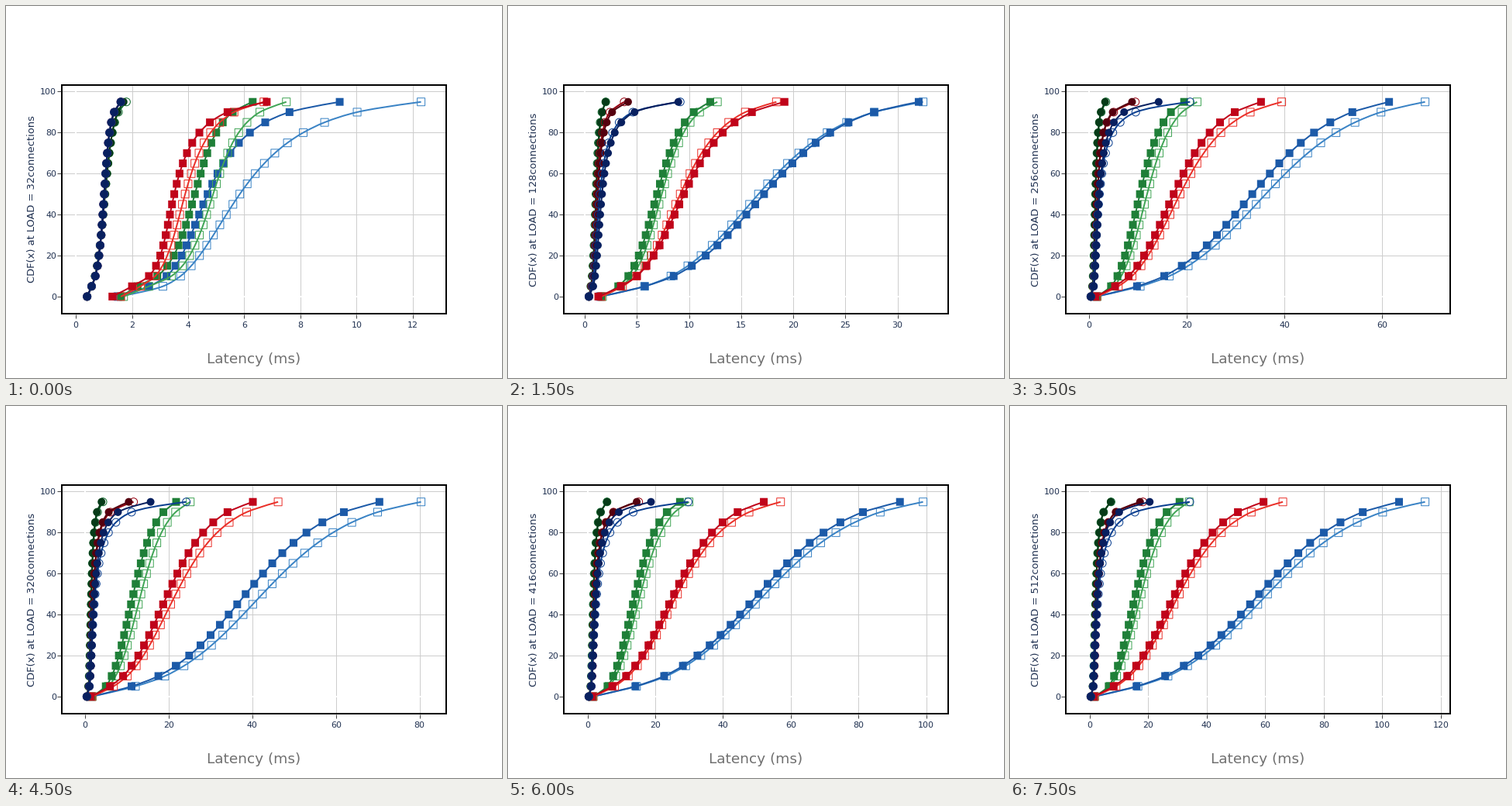
Write a matplotlib script that moves like this. It is 640x480 px and loops after 8 s.

```python
import numpy as np
import matplotlib.pyplot as plt
from matplotlib.animation import FuncAnimation
from matplotlib.patches import PathPatch, Rectangle
from matplotlib.path import Path

W, H, DPI = 640, 480, 100
PX = 72 / DPI
LEFT, RIGHT, TOP, BOTTOM = 72, 568, 102, 397
STEPS, INTERVAL = 16, 500
X_MIN, PX_MIN, PX_MAX = 0.39, 104.3, 535.6
INK = "#1f3050"

plt.rcParams["font.family"] = "DejaVu Sans"

# share of the total growth reached at some steps
KNOTS = [0, 3, 5, 7, 10, 12, 15]
OPEN_PACE = [0, .197, .42, .552, .722, .848, 1]
FILLED_PACE = [0, .235, .4, .54, .68, .86, 1]

PCT = np.arange(0, 100, 5)
ANCHORS = np.array([.05, .30, .80, .95])


def logit(p):
    return np.log(p / (1 - p))


class Series:
    """Latency whose four anchor quantiles grow from light to heavy load."""

    def __init__(self, color, filled, start, light, heavy, bend=1):
        self.color, self.filled, self.start = color, filled, start
        self.light, self.heavy = np.array(light), np.array(heavy)
        self.bend = bend

    def values(self, step):
        pace = FILLED_PACE if self.filled else OPEN_PACE
        grown = np.interp(step, KNOTS, pace) ** self.bend
        q = self.light + (self.heavy - self.light) * grown
        return np.append(self.start, self.curve(q))

    def curve(self, q):
        return np.polyval(np.polyfit(logit(ANCHORS), q, 3), logit(PCT[1:] / 100))


class Square(Series):
    shape = Path(Path.unit_rectangle().vertices * 10 - 5,
                 Path.unit_rectangle().codes)


class Circle(Series):
    shape = Path.circle((0, 0), 5)

    def curve(self, q):
        return np.exp(super().curve(np.log(q)))


SERIES = [
    Square("#3a83c5", False, 1.5, [3.1, 4.9, 8.1, 12.3], [16.5, 47, 85, 114.6]),
    Square("#1c5aa8", True, 1.45, [2.6, 4.1, 6.2, 9.4], [16, 45, 80, 105.7]),
    Square("#41a556", False, 1.7, [2.6, 4.4, 5.8, 7.5], [7, 14, 24.5, 34]),
    Square("#1f7f38", True, 1.6, [2.2, 3.8, 5, 6.3], [6.5, 12.5, 22, 30.7]),
    Square("#ea3029", False, 1.6, [2.3, 3.5, 4.8, 6.7], [9, 23.4, 45, 66]),
    Square("#c0041a", True, 1.3, [2, 3.2, 4.4, 6.8], [8.2, 22.3, 42, 59.4]),
    Circle("#0a6a2a", False, .4, [.56, .9, 1.3, 1.8], [1.1, 1.7, 3.3, 7.3], 2),
    Circle("#063b18", True, .4, [.56, .9, 1.3, 1.7], [1.1, 1.7, 3.3, 7.2], 2),
    Circle("#97000f", False, .4, [.56, .9, 1.2, 1.6], [1.2, 2, 5.1, 18.2], 1.25),
    Circle("#55000f", True, .4, [.56, .9, 1.2, 1.6], [1.2, 2, 5.1, 17.2], 1.25),
    Circle("#0a3f90", False, .4, [.56, .9, 1.2, 1.6], [1.2, 2, 7.5, 34.2], .9),
    Circle("#08205f", True, .4, [.56, .9, 1.2, 1.6], [1.2, 2, 5.5, 20.5], .65),
]


def y_px(p):
    return 374.9 - 2.644 * np.asarray(p)


def spline(pts):
    """Centripetal Catmull-Rom path with quadratic ends."""
    here = pts[1:-1]
    d1, d2 = pts[:-2] - here, pts[2:] - here
    a1 = np.sqrt(np.hypot(*d1.T))[:, None]
    a2 = np.sqrt(np.hypot(*d2.T))[:, None]
    num = a2**2 * d1 - a1**2 * d2
    before = here + num / (3 * a2 * (a1 + a2))
    after = here - num / (3 * a1 * (a1 + a2))
    verts = [pts[0], before[0], pts[1]]
    for k in range(1, len(here)):
        verts += [after[k - 1], before[k], here[k]]
    verts += [after[-1], pts[-1]]
    codes = ([Path.MOVETO] + [Path.CURVE3] * 2
             + [Path.CURVE4] * 3 * (len(here) - 1) + [Path.CURVE3] * 2)
    return Path(verts, codes)


def tick_step(span):
    rough = span / 7.5
    base = 10 ** np.floor(np.log10(rough))
    return next(m * base for m in (1, 2, 5, 10) if rough <= m * base)


def line(x, y, color, width, z):
    ax.plot(x, y, color=color, lw=width * PX, zorder=z, solid_capstyle="butt")


def label(x, y, text, size, color=INK, **kw):
    ax.text(x, y, text, fontsize=size * PX, color=color, va="baseline", **kw)


def draw_axes(zero, scale, load):
    step = tick_step((RIGHT - LEFT) / scale)
    for tick in np.arange(0, (RIGHT - zero) / scale, step):
        x = zero + tick * scale
        if tick:
            line([x, x], [TOP, BOTTOM], "#cdcdcd", 1, 1)
        line([x, x], [BOTTOM + 1, BOTTOM + 6], "#444444", 1, 2)
        label(x, 415, f"{tick:.0f}", 11, ha="center")
    for p in range(0, 101, 20):
        y = y_px(p)
        if p:
            line([LEFT, RIGHT], [y, y], "#cdcdcd", 1, 1)
        line([LEFT - 6, LEFT - 1], [y, y], "#444444", 1, 2)
        label(65, y + 4, str(p), 11, ha="right")
    line([zero, zero], [TOP, BOTTOM], "white", 2, 2)
    line([LEFT, RIGHT], [y_px(0)] * 2, "white", 2, 2)
    ax.add_patch(Rectangle((LEFT, TOP), RIGHT - LEFT, BOTTOM - TOP, fill=False,
                           ec="black", lw=2 * PX, zorder=3))
    label(320, 461, "Latency (ms)", 18.5, "#6f6f6f", ha="center")
    label(37.5, 249.5, f"CDF(x) at LOAD = {load}connections", 13, ha="center",
          rotation=90, rotation_mode="anchor")


def draw_series(s, xs, z):
    pts = np.column_stack([xs, y_px(PCT)])
    ax.add_patch(PathPatch(spline(pts), fill=False, ec=s.color, lw=2 * PX,
                           zorder=z, joinstyle="round"))
    marks = Path.make_compound_path(
        *[Path(s.shape.vertices + p, s.shape.codes) for p in pts])
    if s.filled:
        style = dict(fc=s.color, ec="none")
    else:
        style = dict(fc="none", ec=s.color, lw=PX)
    ax.add_patch(PathPatch(marks, zorder=z, snap=False, **style))


def draw(step):
    ax.cla()
    ax.set(xlim=(0, W), ylim=(H, 0))
    ax.axis("off")
    curves = [s.values(step) for s in SERIES]
    scale = (PX_MAX - PX_MIN) / (np.max(curves) - X_MIN)
    zero = PX_MIN - X_MIN * scale
    draw_axes(zero, scale, 32 * (step + 1))
    for z, (s, xs) in enumerate(zip(SERIES, curves), start=4):
        draw_series(s, zero + scale * xs, z)
    return []


fig = plt.figure(figsize=(W / DPI, H / DPI), dpi=DPI, facecolor="white")
ax = fig.add_axes([0, 0, 1, 1])
anim = FuncAnimation(fig, draw, frames=STEPS, init_func=lambda: [],
                     interval=INTERVAL, repeat=True, repeat_delay=0)
plt.show()
```
